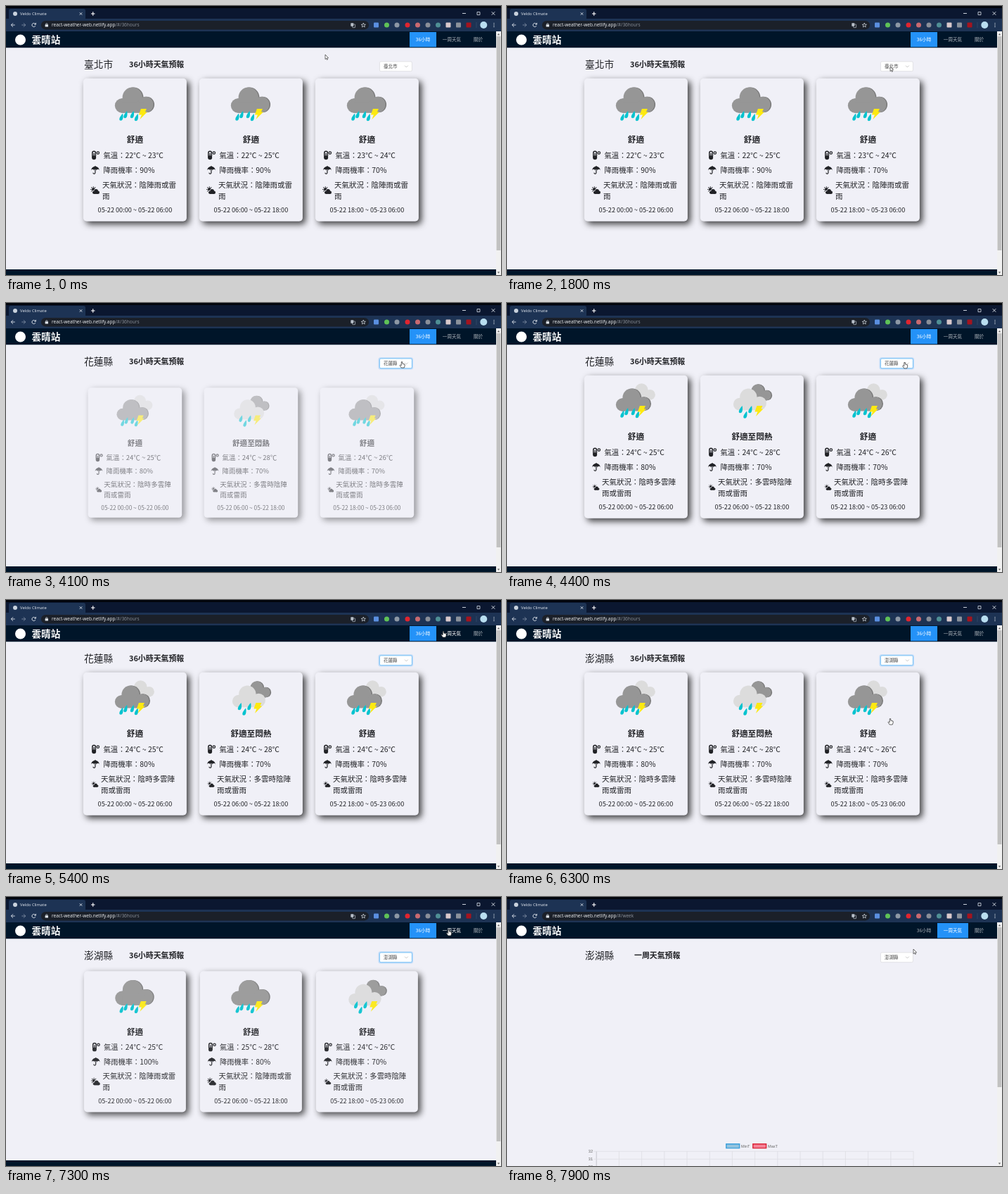
Write an HTML page with a canvas that moves like this. It is 704 by 382 pixels and loops after 8000 ms.

```html
<!DOCTYPE html>
<html lang="zh-Hant">
<head>
<meta charset="utf-8">
<title>Veldo Climate</title>
<style>
html, body { margin: 0; width: 100%; height: 100%; overflow: hidden; background: #f0f0f7; }
canvas { display: block; width: 704px; height: 382px; }
</style>
</head>
<body>
<canvas id="stage"></canvas>
<script>
const W = 704, H = 382, LOOP = 8000;
const CJK = '"Noto Sans CJK TC", "Noto Sans CJK JP", "Noto Sans CJK", sans-serif';
const LATIN = '"Open Sans", "Noto Sans", sans-serif';
const INK = '#212226', PAGE = '#f0f0f7', NAVY = '#001529', BLUE = '#2492f8';
const dpr = window.devicePixelRatio || 1;

function makeCanvas(el) {
  el.width = Math.round(W * dpr);
  el.height = Math.round(H * dpr);
  return el.getContext('2d');
}
const screen2d = makeCanvas(document.getElementById('stage'));
const layer = document.createElement('canvas');
const layer2d = makeCanvas(layer);
let c = screen2d;

// Timeline, in ms
const WEEK_AT = 7450;
const SWITCHES = [
  { open: 2400, leave: 3300, enter: 3835, from: '臺北市', to: '花蓮縣' },
  { open: 5700, leave: 6300, enter: 6840, from: '花蓮縣', to: '澎湖縣' }
];
const CITIES = ('臺北市 新北市 桃園市 臺中市 臺南市 高雄市 基隆市 新竹縣 新竹市 苗栗縣 彰化縣 ' +
  '南投縣 雲林縣 嘉義縣 嘉義市 屏東縣 花蓮縣 宜蘭縣 臺東縣 澎湖縣 金門縣 連江縣').split(' ');
const PATH = [
  [0, 454, 69], [1400, 454, 69], [1800, 545, 86], [2300, 549, 85], [2600, 546, 120],
  [3200, 540, 127], [3400, 541, 124], [3700, 548, 108], [4100, 563, 83], [4500, 566, 84],
  [4900, 600, 66], [5400, 622, 44], [5650, 562, 85], [5800, 556, 88], [6150, 545, 168],
  [6300, 545, 168], [6700, 610, 70], [6900, 625, 45], [7400, 630, 46], [7600, 630, 46],
  [7900, 578, 74]
];
const HAND = [[3950, 4650], [5250, 5500], [5620, 6350], [6800, 7680]];

const DARK = 'dark', MIXED = 'mixed', LIGHT = 'light';
const DATES = ['05-22 00:00 ~ 05-22 06:00', '05-22 06:00 ~ 05-22 18:00', '05-22 18:00 ~ 05-23 06:00'];
const SKY = { dark: '陰陣雨或雷雨', mixed: '陰時多雲陣雨或雷雨', light: '多雲時陰陣雨或雷雨' };
const FORECAST = {
  '臺北市': [[22, 23, 90, DARK], [22, 25, 90, DARK], [23, 24, 70, DARK]],
  '花蓮縣': [[24, 25, 80, MIXED], [24, 28, 70, LIGHT, '舒適至悶熱'], [24, 26, 70, MIXED]],
  '澎湖縣': [[24, 25, 100, DARK], [25, 28, 80, DARK], [24, 26, 70, LIGHT]]
};

const clamp = v => Math.max(0, Math.min(1, v));
const ease = p => p * p * (3 - 2 * p);

function box(x, y, w, h, fill, r = 0, stroke, lw = 1) {
  c.beginPath();
  c.roundRect(x, y, w, h, r);
  if (fill) { c.fillStyle = fill; c.fill(); }
  if (stroke) { c.strokeStyle = stroke; c.lineWidth = lw; c.stroke(); }
}
function disc(x, y, r, fill) {
  c.beginPath();
  c.arc(x, y, r, 0, 7);
  c.fillStyle = fill;
  c.fill();
}
function poly(points, fill, stroke, lw = 1, closed = true) {
  c.beginPath();
  points.forEach(([x, y], i) => i ? c.lineTo(x, y) : c.moveTo(x, y));
  if (closed) c.closePath();
  if (fill) { c.fillStyle = fill; c.fill(); }
  if (stroke) { c.strokeStyle = stroke; c.lineWidth = lw; c.stroke(); }
}
const line = (points, color, lw = 1) => poly(points, null, color, lw, false);

// y is the vertical middle of the text
function text(s, x, y, size, fill = INK, { align = 'left', weight = 400, font = CJK } = {}) {
  c.font = `${weight} ${size}px ${font}`;
  c.textAlign = align;
  c.fillStyle = fill;
  c.fillText(s, x, y + size * 0.37);
}

function drawBrowser(week) {
  box(0, 0, W, 18, '#0b1730');
  box(0, 0, W, 3, '#02050c');
  box(4, 4, 109, 16, '#1d3354', 3);
  box(0, 18, W, 18, '#1d3354');
  disc(13, 11, 3, '#c9d2dd');
  text('Veldo Climate', 20, 11, 5.9, '#e4e9f0', { font: LATIN });
  const cross = (x, y, r) => {
    line([[x - r, y - r], [x + r, y + r]], '#e4e9f0', 0.9);
    line([[x + r, y - r], [x - r, y + r]], '#e4e9f0', 0.9);
  };
  cross(106.5, 11, 1.7);
  line([[121, 11], [126.4, 11]], '#fff', 1.1);
  line([[123.7, 8.3], [123.7, 13.7]], '#fff', 1.1);
  line([[649, 10.5], [654, 10.5]], '#dfe5ec', 0.9);
  box(670, 8.6, 4, 4, null, 0, '#dfe5ec', 0.8);
  cross(693, 10.5, 2.3);

  const arrow = (x, d, col) => {
    line([[x - 2.7, 27], [x + 2.7, 27]], col, 0.9);
    line([[x, 24.3], [x + 2.7 * d, 27], [x, 29.7]], col, 0.9);
  };
  arrow(10, -1, '#dfe5ec');
  arrow(25, 1, '#7f8ea3');
  c.beginPath();
  c.arc(39.5, 27, 2.6, 0.4, 5.6);
  c.strokeStyle = '#dfe5ec';
  c.lineWidth = 0.9;
  c.stroke();
  poly([[42.8, 23.6], [42.8, 26.6], [39.8, 26.6]], '#dfe5ec');

  box(50, 21, 466, 12.4, '#1b2029', 6.2);
  box(55.6, 26.2, 4.4, 3.4, '#dfe5ec', 0.5);
  c.beginPath();
  c.arc(57.8, 26, 1.3, Math.PI, 0);
  c.strokeStyle = '#dfe5ec';
  c.lineWidth = 0.7;
  c.stroke();
  const host = 'react-weather-web.netlify.app';
  text(host, 65, 27, 6.5, '#f0f2f5', { font: LATIN });
  text(week ? '/#/week' : '/#/36hours', 65 + c.measureText(host).width, 27, 6.5, '#8d939d', { font: LATIN });
  box(490.3, 24.2, 4, 4.6, '#b9c0ca', 0.6);
  box(492.6, 26, 4, 4.6, null, 0.6, '#b9c0ca', 0.7);
  const star = Array.from({ length: 10 }, (_, i) => {
    const a = i * Math.PI / 5 - Math.PI / 2, r = i % 2 ? 1.4 : 3.3;
    return [508.3 + r * Math.cos(a), 27.3 + r * Math.sin(a)];
  });
  poly(star, null, '#dfe5ec', 0.7);

  box(523, 23.5, 7, 7, '#5a8fe0', 1);
  box(625.5, 23.5, 7, 7, '#d9c9cc', 1);
  box(640, 23.5, 7, 7, '#8b929b', 1);
  box(654.5, 23.5, 7, 7, '#a3141f', 1);
  [[541.5, '#5fc257'], [556, '#8d98a5'], [571, '#e0252f'], [585.5, '#c96a70'],
   [600, '#8a8f99'], [614.5, '#4f8f95']].forEach(([x, col]) => disc(x, 27, 3.5, col));
  line([[669, 23], [669, 31]], '#3b506f', 0.7);
  disc(679.3, 27, 5, '#b9def0');
  [24.6, 27, 29.4].forEach(y => disc(694, y, 0.7, '#dfe5ec'));
}

function drawNav(t, week, px, py) {
  box(0, 36, W, 23.3, NAVY);
  disc(20.5, 48, 7.5, '#fff');
  text('雲晴站', 36.5, 48, 13.6, '#fff', { weight: 700 });
  const items = [['36小時', 574, 38, !week], ['一周天氣', 612, 44, week], ['關於', 656, 31, false]];
  items.forEach(([label, x, w, active]) => {
    if (active) box(x, 37, w, 21.3, BLUE);
    const hover = px > x && px < x + w && py > 37 && py < 58;
    text(label, x + w / 2, 47.6, 6.6, active || hover ? '#fff' : '#a9b0b8', { align: 'center', weight: 500 });
  });
}

function drawScrollbar(week) {
  box(697, 36, 7, 346, '#f1f1f1');
  box(697.6, 43, 5.8, week ? 227 : 304, '#c1c1c1');
  poly([[698.8, 41.2], [702.2, 41.2], [700.5, 39]], '#606060');
  poly([[698.8, 377.6], [702.2, 377.6], [700.5, 379.8]], '#606060');
}

function drawSelect(city, focused) {
  if (focused) box(530.3, 78, 48, 15.6, null, 2.4, 'rgba(24,144,255,.22)', 1.6);
  box(531.4, 78.9, 46, 13.8, '#fff', 1.8, focused ? '#58b4f5' : '#dcdce0', 0.8);
  text(city, 537, 85.7, 6.5, '#444');
  line([[567, 84.6], [569.4, 87], [571.8, 84.6]], '#bbb', 0.8);
}

function drawDropdown(t, sw, py) {
  const pitch = 13.5, top = 97, view = pitch * 8;
  const grow = ease(clamp((t - sw.open) / 150));
  const start = CITIES.indexOf(sw.from) > 8 ? CITIES.length * pitch - view : 0;
  const end = CITIES.length * pitch - view;
  const scroll = start + (end - start) * ease(clamp((t - sw.open - 200) / 500));
  c.save();
  c.globalAlpha = grow;
  c.translate(0, 95);
  c.scale(1, 0.8 + 0.2 * grow);
  c.translate(0, -95);
  c.shadowColor = 'rgba(0,0,0,.18)';
  c.shadowBlur = 5 * dpr;
  c.shadowOffsetY = dpr;
  box(531, 95, 47, view + 4, '#fff', 2);
  c.shadowColor = 'transparent';
  c.beginPath();
  c.rect(531, top, 47, view);
  c.clip();
  CITIES.forEach((city, i) => {
    const y = top + i * pitch - scroll;
    const chosen = city === sw.from;
    if (chosen) box(531, y, 47, pitch, '#e6f7ff');
    else if (py > y && py <= y + pitch) box(531, y, 47, pitch, '#f3f3f3');
    text(city, 537, y + pitch / 2, 6.5, '#333', { weight: chosen ? 700 : 400 });
  });
  c.restore();
}

function cloud(x, y, s, fill, edge) {
  const shape = (dx, col) => {
    c.fillStyle = col;
    [[10, 27, 10.5], [25, 15, 14.5], [44, 25.5, 11.5]].forEach(([a, b, r]) => disc(x + dx + a * s, y + b * s, r * s, col));
    box(x + dx + 10 * s, y + 22 * s, 34 * s, 15.2 * s, col, 2 * s);
  };
  if (edge) shape(0.8, edge);
  shape(-0.6, fill);
}
function drop(x, y) {
  c.beginPath();
  c.moveTo(x + 2.2, y - 5.5);
  c.bezierCurveTo(x + 3.2, y, x + 2.4, y + 4.8, x - 0.6, y + 4.8);
  c.bezierCurveTo(x - 4.2, y + 4.6, x - 3, y, x + 2.2, y - 5.5);
  c.fillStyle = '#05c3cf';
  c.fill();
}

// Cards are drawn around x = 0
function drawSky(kind) {
  const grey = '#969696', deep = '#777', pale = '#dcdcdc';
  let drops = [[-19.5, 158], [-13.5, 154.5], [-4, 154.5], [2, 158.5]], bolt = 0;
  if (kind === DARK) {
    cloud(-27.5, 115, 0.98, grey, deep);
  } else if (kind === MIXED) {
    cloud(-7.5, 114, 0.64, pale);
    cloud(-27.5, 121, 0.87, grey, deep);
    bolt = -3;
  } else {
    cloud(-7, 115, 0.63, grey, deep);
    cloud(-25.5, 121, 0.84, pale);
    drops = [[-16, 151.5], [-2.5, 151.5], [-9.5, 159]];
    bolt = -1.5;
  }
  drops.forEach(([x, y]) => drop(x, y));
  poly([[8.5, 146], [16.5, 146], [14.5, 150.5], [17.5, 150.5], [7, 161], [9.5, 154.5], [5.5, 154.5]]
    .map(([x, y]) => [x + bolt, y]), '#fde910');
}

function drawThermometer() {
  box(-60.6, 206.3, 4.6, 9, null, 2.3, INK, 1.5);
  disc(-58.3, 215.3, 3, INK);
  line([[-58.3, 209], [-58.3, 215]], INK, 1.3);
  c.beginPath();
  c.arc(-52.6, 208.6, 1.7, 0, 7);
  c.strokeStyle = INK;
  c.lineWidth = 1.3;
  c.stroke();
}
function drawUmbrella() {
  c.beginPath();
  c.arc(-56.5, 233.6, 5.9, Math.PI, 0);
  [-52.6, -56.5, -60.4].forEach(x => c.arc(x, 233.8, 1.95, 0, Math.PI, true));
  c.fillStyle = INK;
  c.fill();
  c.beginPath();
  c.moveTo(-56.5, 227);
  c.lineTo(-56.5, 236.8);
  c.arc(-58, 236.8, 1.5, 0, Math.PI);
  c.strokeStyle = INK;
  c.lineWidth = 1.2;
  c.stroke();
}
function drawCloudSun(s) {
  c.save();
  c.translate(-57, 262);
  c.scale(s, s);
  for (let i = 0; i < 8; i++) {
    const a = i * Math.PI / 4;
    line([[-2 + 2.6 * Math.cos(a), -1.5 + 2.6 * Math.sin(a)], [-2 + 4 * Math.cos(a), -1.5 + 4 * Math.sin(a)]], INK, 1);
  }
  disc(-2, -1.5, 2.2, INK);
  const puffs = grow => [[-1.3, 2.7, 2], [1.6, 0.9, 2.7], [4.2, 2.6, 2.1]].forEach(([x, y, r]) =>
    disc(x, y, r + grow, grow ? PAGE : INK));
  puffs(0.7);
  puffs(0);
  box(-1.3, 2, 5.5, 2.7, INK);
  c.restore();
}

function drawCard([min, max, rain, kind, feel = '舒適'], date, cx, s) {
  c.save();
  c.translate(cx, 295);
  c.scale(s, s);
  c.translate(0, -295);
  c.shadowColor = 'rgba(0,0,0,.75)';
  c.shadowBlur = 10 * s * dpr;
  c.shadowOffsetX = c.shadowOffsetY = 4 * s * dpr;
  box(-73.5, 102.7, 147, 203, PAGE, 5);
  c.shadowColor = 'transparent';
  drawSky(kind);
  text(feel, 0, 190, 11.6, INK, { align: 'center', weight: 700 });
  drawThermometer();
  text(`氣溫：${min}℃ ~ ${max}℃`, -45, 212, 10.4);
  drawUmbrella();
  text(`降雨機率：${rain}%`, -45, 233, 10.4);
  const long = SKY[kind].length > 6;
  drawCloudSun(long ? 0.8 : 1.05);
  const sky = '天氣狀況：' + SKY[kind], x = long ? -48.5 : -46.5;
  text(sky.slice(0, 10), x, 254, 10.5);
  text(sky.slice(10), x, 270, 10.5);
  text(date, 0, 290, 9.15, INK, { align: 'center' });
  c.restore();
}

function cardState(t) {
  const state = { city: '臺北市', alpha: 1, scale: 1 };
  for (const sw of SWITCHES) {
    if (t < sw.leave) break;
    if (t < sw.enter) {
      const p = clamp((t - sw.leave) / 255);
      state.alpha = 1 - p;
      state.scale = 1 - 0.17 * p * p;
    } else {
      const p = clamp((t - sw.enter) / 500);
      state.city = sw.to;
      state.alpha = p;
      state.scale = 0.78 + 0.22 * p * (1.22 - 0.22 * p);
    }
  }
  return state;
}

function drawCards(t) {
  const { city, alpha, scale } = cardState(t);
  if (!alpha) return;
  c = layer2d;
  c.setTransform(dpr, 0, 0, dpr, 0, 0);
  c.clearRect(0, 0, W, H);
  FORECAST[city].forEach((data, i) => drawCard(data, DATES[i], 183.4 + i * 165, scale));
  c = screen2d;
  c.globalAlpha = alpha;
  c.drawImage(layer, 0, 0, W, H);
  c.globalAlpha = 1;
}

function drawChart() {
  const legend = (x, label, fill, stroke) => {
    box(x + 0.8, 350.8, 18.8, 5.8, fill, 0, stroke, 1.4);
    text(label, x + 22, 353.6, 5.6, '#666', { font: '"Liberation Sans", Arial, sans-serif' });
  };
  legend(311, 'MinT', '#93c3de', '#3a9fdc');
  legend(349, 'MaxT', '#f58296', '#d92337');
  for (let i = 0; i < 15; i++) {
    const x = 127.2 + i * 32.2;
    line([[x, 361], [x, H]], i ? '#dedee4' : '#bdbdc4', 0.8);
  }
  [32, 31, 30].forEach((n, i) => {
    const y = 361.2 + i * 11;
    line([[123, y], [578, y]], '#dedee4', 0.8);
    text(n, 122, y, 5.6, '#666', { align: 'right', font: '"Liberation Sans", Arial, sans-serif' });
  });
}

function pointerAt(t) {
  let i = PATH.findIndex(p => p[0] > t);
  if (i < 0) return PATH[PATH.length - 1].slice(1);
  const [t0, x0, y0] = PATH[i - 1], [t1, x1, y1] = PATH[i];
  const p = ease((t - t0) / (t1 - t0));
  return [x0 + (x1 - x0) * p, y0 + (y1 - y0) * p];
}
function drawPointer(x, y, hand) {
  c.save();
  c.translate(x, y);
  c.lineJoin = 'round';
  if (hand) {
    poly([[-0.7, 0.6], [0.7, 0.6], [0.9, 3.2], [4, 4], [4.2, 6.2], [3.2, 9], [-0.8, 9], [-3, 5.6], [-2.2, 4.8], [-0.8, 5.8]],
      '#fff', '#222', 0.7);
  } else {
    poly([[0, 0], [0, 6.6], [1.5, 5.3], [2.5, 7.4], [3.5, 6.9], [2.6, 4.9], [4.5, 4.7]], '#fff', '#333', 0.7);
  }
  c.restore();
}

function draw(t) {
  const week = t >= WEEK_AT;
  const [px, py] = pointerAt(t);
  const city = SWITCHES.reduce((name, sw) => t >= sw.leave ? sw.to : name, '臺北市');
  c.setTransform(dpr, 0, 0, dpr, 0, 0);
  box(0, 0, W, H, PAGE);
  drawBrowser(week);
  drawNav(t, week, px, py);
  text(city, 111, 83, 13.7, INK, { weight: 500 });
  text(week ? '一周天氣預報' : '36小時天氣預報', week ? 181 : 175, 83, 10.9, INK, { weight: 700 });
  if (week) {
    drawChart();
  } else {
    drawCards(t);
    box(0, 374, 697, 8, NAVY);
  }
  drawSelect(city, t >= SWITCHES[0].open && !week);
  const open = SWITCHES.find(sw => t >= sw.open && t < sw.leave);
  if (open) drawDropdown(t, open, py);
  drawScrollbar(week);
  drawPointer(px, py, HAND.some(([a, b]) => t >= a && t < b));
}

const begin = performance.now();
function tick() {
  draw((performance.now() - begin) % LOOP);
  requestAnimationFrame(tick);
}
tick();
</script>
</body>
</html>
```
